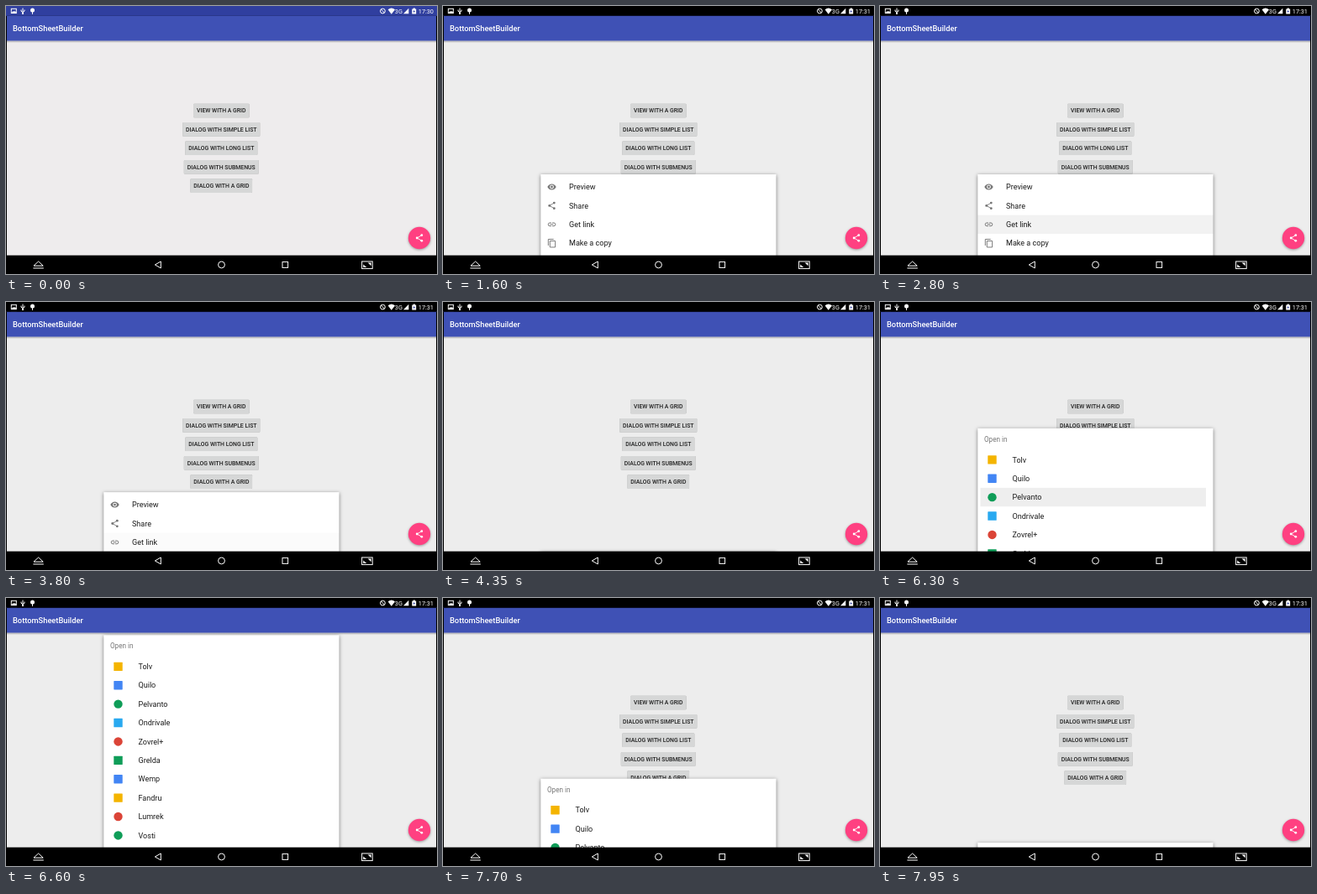
An HTML page for the animation above (8000 ms loop, 513 by 320 pixels).

```html
<!DOCTYPE html>
<html lang="en">
<head>
<meta charset="utf-8">
<title>BottomSheetBuilder</title>
<style>
  html, body { margin: 0; width: 100%; height: 100%; overflow: hidden; background: #000; }
  svg { display: block; width: 100vw; height: 100vh; font-family: Roboto, sans-serif; }
  .title { font-size: 9.3px; font-weight: 500; fill: #fff; }
  .status text { font-size: 7.3px; fill: #fff; }
  .button rect { fill: #d6d7d7; filter: drop-shadow(0 .8px .6px rgba(0, 0, 0, .3)); }
  .button text { font-size: 6.9px; font-weight: 500; fill: #1f1f1f; text-anchor: middle; }
  .paper { fill: #fff; filter: drop-shadow(0 1px 2px rgba(0, 0, 0, .5)); }
  .row { font-size: 9.05px; fill: #1c1c1c; }
  .header { font-size: 8.15px; fill: #757575; }
  .fab { fill: #ff4081; filter: drop-shadow(0 1.5px 1.5px rgba(0, 0, 0, .35)); }
  .line { fill: none; stroke: #fff; stroke-width: 1; }
</style>
</head>
<body>
<svg viewBox="0 0 513 320" preserveAspectRatio="none">
  <defs>
    <linearGradient id="barShadow" x2="0" y2="1">
      <stop stop-opacity=".3"/><stop offset="1" stop-opacity="0"/>
    </linearGradient>
    <!-- Icons are centred on 0,0 -->
    <g id="eye">
      <path fill="#757575" fill-rule="evenodd" d="M-5.2 0Q-3.4-3.5 0-3.5T5.2 0Q3.4 3.5 0 3.5T-5.2 0ZM-2.4 0a2.4 2.4 0 1 0 4.8 0a2.4 2.4 0 1 0-4.8 0Z"/>
      <circle r="1.4" fill="#757575"/>
    </g>
    <g id="share">
      <path d="M2.8-3.3L-2.8 0L2.8 3.3" fill="none" stroke="currentColor" stroke-width=".9"/>
      <g fill="currentColor"><circle cx="2.8" cy="-3.3" r="1.4"/><circle cx="-2.8" r="1.4"/><circle cx="2.8" cy="3.3" r="1.4"/></g>
    </g>
    <path id="link" fill="none" stroke="#757575" stroke-width=".95" d="M-.5-1.9H-2.4a1.9 1.9 0 0 0 0 3.8H-.5M.5-1.9H2.4a1.9 1.9 0 0 1 0 3.8H.5M-1.9 0H1.9"/>
    <path id="copy" fill="none" stroke="#757575" stroke-width=".95" d="M-4.2 2.8V-4.7H2.2M-2.2-2.7H4.1V4.8H-2.2Z"/>
  </defs>

  <rect id="page" y="12" width="513" height="286"/>
  <g id="buttons"></g>
  <rect y="41.5" width="513" height="2.5" fill="url(#barShadow)"/>
  <rect y="11.5" width="513" height="30" fill="#3f51b5"/>
  <text class="title" x="8" y="30">BottomSheetBuilder</text>

  <circle class="fab" cx="492" cy="277" r="13.2"/>
  <use href="#share" x="492" y="277" color="#fff"/>

  <g id="sheet">
    <rect class="paper" x="116.3" width="280.2" height="300"/>
    <rect id="touch"/>
    <g id="actions"></g>
    <g id="apps"><text class="header" x="124" y="16">Open in</text></g>
  </g>
  <path d="M.5 12V298M512.5 12V298" stroke="#000"/>

  <g class="status">
    <rect width="513" height="11.7" fill="#303f9f"/>
    <rect id="dim" width="513" height="11.7"/>
    <rect class="line" x="6.3" y="3.3" width="6" height="5.2" stroke-width=".8"/>
    <path fill="#fff" d="M7 8L8.6 5.8L9.6 7L10.6 5.6L12 8Z"/>
    <path class="line" stroke-width=".8" d="M20 2.5V9.5M18 4.5V6.2L20 7.6L22 6V4.5"/>
    <circle cx="20" cy="9" r="1" fill="#fff"/>
    <circle cx="31.5" cy="5" r="2.5" fill="#fff"/><path class="line" d="M31.5 6V9.8"/>
    <circle class="line" cx="448.4" cy="6" r="2.9" stroke-width=".9"/><path class="line" stroke-width=".9" d="M446.4 4L450.4 8"/>
    <path fill="#fff" d="M454.6 4.2Q458.8 1 463 4.2L458.8 9.7Z"/>
    <text x="462.8" y="8.8">3G</text>
    <path fill="#fff" d="M473 9.2H479.3V2.8Z"/>
    <path fill="#fff" d="M483.3 3.4H484.7V2.5H486.8V3.4H488.2V9.6H483.3Z"/>
    <path fill="#303f9f" d="M486.2 4.3L484.5 6.9H485.6L485.2 8.7L487 6H485.9Z"/>
    <text id="clock" x="490.8" y="8.8"></text>
  </g>

  <rect y="297.7" width="513" height="22.3"/>
  <g class="line">
    <path d="M33 310.2L38.6 305L44.2 310.2ZM32.4 313H44.8"/>
    <path d="M177.3 309L184.3 305V313Z"/>
    <circle cx="256.5" cy="309" r="3.9"/>
    <rect x="329" y="305.6" width="6.6" height="6.8"/>
  </g>
  <g id="capture">
    <rect class="line" x="423.6" y="305" width="12.6" height="8.6"/>
    <path fill="#fff" d="M430.6 306.6H434.6V310.2ZM425.2 308.6V312H429.2Z"/>
  </g>
</svg>
<script>
const $ = id => document.getElementById(id);
const ROW = 22.4, PEEK = 201, FULL = 43.4, HIDDEN = 298;

function add(parent, name, attrs, text = '') {
  const el = document.createElementNS('http://www.w3.org/2000/svg', name);
  set(el, attrs);
  el.textContent = text;
  return parent.appendChild(el);
}
function set(el, attrs) {
  for (const key in attrs) el.setAttribute(key, attrs[key]);
}

const buttons = [
  ['VIEW WITH A GRID', 66.5], ['DIALOG WITH SIMPLE LIST', 92], ['DIALOG WITH LONG LIST', 86],
  ['DIALOG WITH SUBMENUS', 89], ['DIALOG WITH A GRID', 73.5]
].map(([label, width], i) => {
  const y = 125 + i * ROW, group = add($('buttons'), 'g', { class: 'button' });
  const box = add(group, 'rect', { x: 256.3 - width / 2, y: y - 8.3, width, height: 16.6, rx: 1 });
  add(group, 'text', { x: 256.3, y: y + 2.4 }, label);
  return box;
});

[['eye', 'Preview'], ['share', 'Share'], ['link', 'Get link'], ['copy', 'Make a copy']].forEach(([icon, label], i) => {
  const y = 15 + i * ROW;
  add($('actions'), 'use', { href: '#' + icon, x: 129.5, y, color: '#757575' });
  add($('actions'), 'text', { class: 'row', x: 150, y: y + 3.2 }, label);
});

[
  ['Tolv', '#f4b400'], ['Quilo', '#4285f4'], ['Pelvanto', '#0f9d58', 1], ['Ondrivale', '#29a9f0'],
  ['Zovrel+', '#db4437', 1], ['Grelda', '#0f9d58'], ['Wemp', '#4285f4'], ['Fandru', '#f4b400'],
  ['Lumrek', '#db4437', 1], ['Vosti', '#0f9d58', 1]
].forEach(([label, fill, round], i) => {
  const y = 37.5 + i * ROW;
  add($('apps'), 'rect', { x: 128.3, y: y - 5.2, width: 10.4, height: 10.4, rx: round ? 5.2 : .6, fill });
  add($('apps'), 'text', { class: 'row', x: 157.5, y: y + 3.2 }, label);
});

const ramp = (t, from, to) => Math.min(1, Math.max(0, (t - from) / (to - from)));
const mix = (a, b, p) => a + (b - a) * p;
const settle = p => 1 - (1 - p) ** 5;
const smooth = p => (1 - Math.cos(Math.PI * p)) / 2;

function sheetTop(t, longList) {
  const enter = smooth(ramp(t, longList ? 5100 : 1100, longList ? 5250 : 1250));
  if (enter < 1) return PEEK + 57 * (1 - enter);
  if (!longList) return mix(PEEK, HIDDEN, settle(ramp(t, 3755, 4495)));
  if (t < 6270) return mix(PEEK, 188, ramp(t, 6100, 6270) ** 2);
  if (t < 7400) return mix(188, FULL, settle(ramp(t, 6270, 6790)));
  if (t < 7569) return mix(FULL, 80, ramp(t, 7350, 7569) ** 2);
  return mix(80, HIDDEN, settle(ramp(t, 7569, 8309)));
}

function draw(t) {
  const longList = t >= 4500, start = longList ? 4000 : 0, local = t - start;
  const dim = longList ? ramp(t, 4900, 5000) : ramp(t, 900, 1000) - ramp(t, 4400, 4500);
  const enter = smooth(ramp(local, 1100, 1250));

  set($('page'), { fill: t < 500 ? '#eeeced' : '#ededed' });
  $('clock').textContent = t < 500 ? '17:30' : '17:31';
  set($('dim'), { opacity: dim });
  set($('capture'), { opacity: 1 - ramp(local, 900, 1000) + ramp(local, 1250, 1600) });

  const press = ramp(local, 850, 950) - ramp(local, 1150, 1350);
  buttons.forEach((box, i) => {
    box.style.fill = i === (longList ? 2 : 1) ? `rgb(${[214, 215, 215].map(c => c - 12 * press)})` : '';
  });

  set($('sheet'), { transform: `translate(0 ${sheetTop(t, longList)})`, opacity: enter });
  set($('actions'), { display: longList ? 'none' : 'inline' });
  set($('apps'), { display: longList ? 'inline' : 'none' });
  set($('touch'), longList
    ? { x: 119.5, y: 71, width: 268.5, height: ROW, opacity: .065 * (ramp(t, 6050, 6200) - ramp(t, 6300, 6450)) }
    : { x: 116.3, y: 48.6, width: 280.2, height: ROW, opacity: .06 * ramp(t, 2500, 2650) - .045 * ramp(t, 2750, 3000) });
}

function tick() {
  draw(Math.floor(performance.now() % 8000 / 50) * 50);
  requestAnimationFrame(tick);
}
tick();
</script>
</body>
</html>
```
